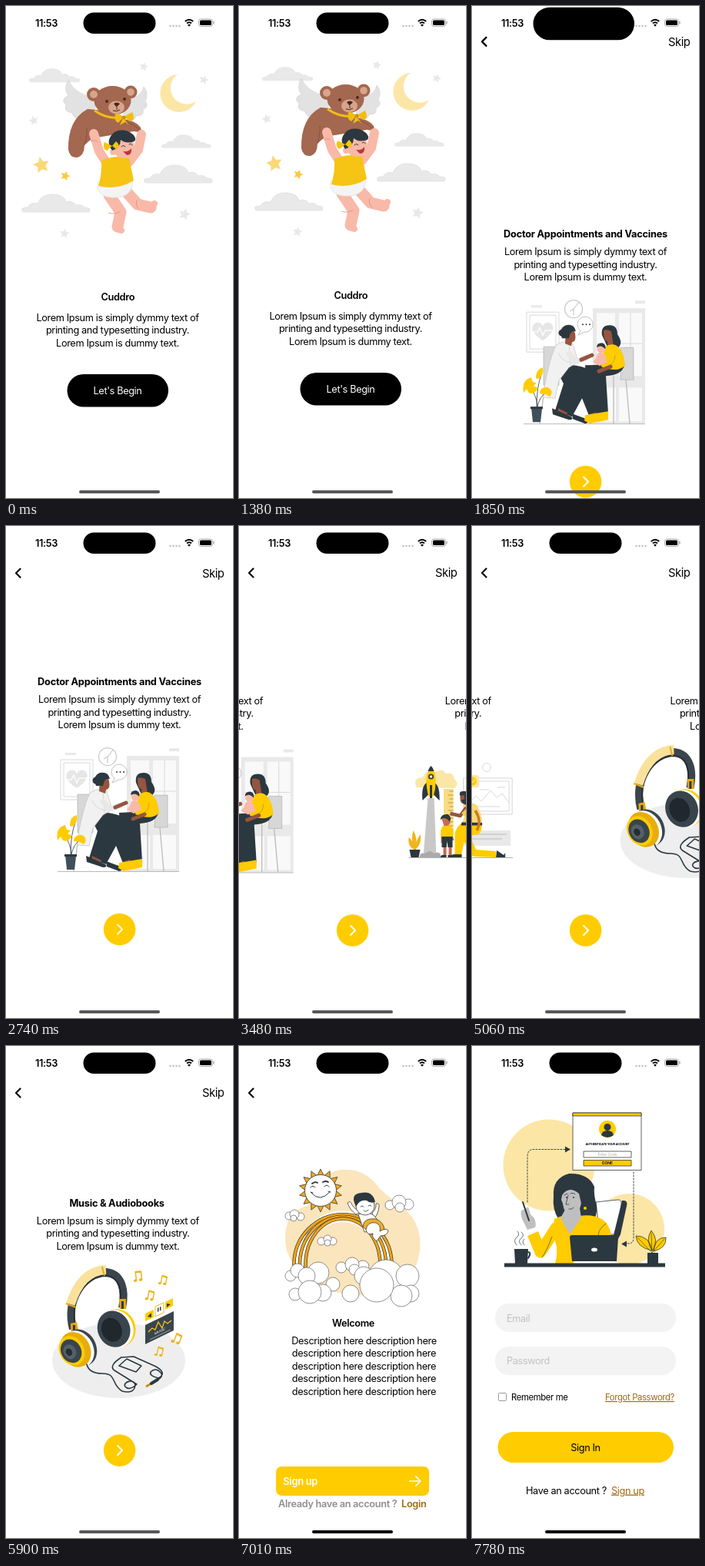
Write an HTML page that moves like this. It is 295 by 640 pixels and loops after 7.88 s.

```html
<!DOCTYPE html>
<html lang="en">
<head>
<meta charset="utf-8">
<title>Baby app onboarding</title>
<style>
html, body { margin: 0; height: 100%; overflow: hidden; background: #fff; }
svg { display: block; width: 100vw; height: 100vh; }
text { font: 12.76px Inter, "Liberation Sans", sans-serif; letter-spacing: -.03em; }
.c { text-anchor: middle; }
.b { font-weight: 600; letter-spacing: -.026em; }
.h { font-weight: 700; letter-spacing: -.018em; text-anchor: middle; }
.y { fill: #fc0; } .p { fill: #fce6a6; } .k { fill: #2c383f; } .g { fill: #e9e9e9; } .w { fill: #fff; }
.br { fill: #a4674f; } .sk { fill: #f8b9a8; } .dk { fill: #96553f; } .lk { fill: #a06a10; }
.l { fill: none; stroke: #2c383f; stroke-linecap: round; stroke-linejoin: round; }
.gl { fill: none; stroke: #d9d9d9; }
.o { stroke: #222; stroke-width: .7; stroke-linejoin: round; }
.u { text-decoration: underline; }
.s { font-size: 11.27px; }
</style>
</head>
<body>
<svg viewBox="0 0 295 640" preserveAspectRatio="none">
<defs>
  <path id="cloud" d="M2 24Q-3 18 8 18Q12 11 21 13Q26 0 42 1Q56 2 58 11Q66 8 71 15Q78 13 82 18Q92 18 88 24Z" stroke="#ddd" stroke-width=".7"/>
  <path id="star" stroke-linejoin="round"/>
  <g id="note"><path d="M-3 5L-1-6L6-4L4 6" fill="none" stroke="#efb41c" stroke-width="1.5"/><path d="M-1-5.500L6-3.500" stroke="#efb41c" stroke-width="2.400"/><ellipse cx="-4.500" cy="5" rx="2.300" ry="1.800" fill="#efb41c"/><ellipse cx="2.500" cy="6" rx="2.300" ry="1.800" fill="#efb41c"/></g>
  <g id="lorem" class="c"><text x="147.5" y="231.7">Lorem Ipsum is simply dymmy text of</text><text x="147.5" y="248.2">printing and typesetting industry.</text><text x="147.5" y="264.7">Lorem Ipsum is dummy text.</text></g>
</defs>

<g id="intro">
  <g class="g">
    <use href="#cloud" transform="translate(30 81)scale(.74)"/><use href="#cloud" transform="translate(202 167)scale(.72)"/>
    <use href="#cloud" transform="translate(179 206)"/><use href="#cloud" transform="translate(20 244)"/>
    <use href="#star" transform="translate(179 79)rotate(15)scale(.6)"/><use href="#star" transform="translate(257 96)rotate(20)scale(.62)"/>
    <use href="#star" transform="translate(36 149)rotate(-15)scale(.65)"/><use href="#star" transform="translate(232 271)rotate(15)scale(.8)"/>
    <use href="#star" transform="translate(76 296)rotate(10)scale(.65)"/>
  </g>
  <path class="p" d="M223 89A24.500 24.500 0 1 0 247 124A21.200 21.200 0 0 1 223 89Z"/>
  <use href="#star" fill="#f9d877" transform="translate(46 207)rotate(-12)scale(1.1)"/>
  <use href="#star" fill="#facc3c" transform="translate(77 221)rotate(20)scale(.65)"/>
  <g fill="#e2e2e2" stroke="#d2d2d2" stroke-width=".6">
    <path d="M116 120Q88 114 81 96Q74 108 81 117Q70 121 78 129Q74 137 86 139Q87 148 100 146L116 146Z"/>
    <path d="M150 124Q176 120 179 105Q186 113 181 124Q187 130 178 135Q180 143 169 143Q168 152 154 146Z"/>
  </g>
  <path class="br" d="M106 134Q80 148 81 187Q83 198 93 197Q102 194 102 181Q112 170 125 170L166 163Q178 166 175 158Q170 150 153 147L128 136Z"/>
  <path d="M102 181Q106 168 105 158M151 150Q165 152 173 161" fill="none" stroke="#844a39" stroke-width=".8"/>
  <g class="br"><circle cx="114" cy="115" r="9"/><circle cx="162" cy="112" r="8.500"/><ellipse cx="138.500" cy="123" rx="24" ry="19"/></g>
  <g fill="#d7a48c"><circle cx="114" cy="115" r="5"/><circle cx="162" cy="112" r="4.800"/><ellipse cx="143.500" cy="132" rx="10.500" ry="8.500"/></g>
  <g fill="#49271f"><circle cx="131" cy="124" r="1.900"/><circle cx="154" cy="121" r="1.900"/><path d="M140 127Q144 124 148 127Q145 131 143 131Z"/></g>
  <path d="M144 131V135M139 136Q144 138 148 135" fill="none" stroke="#49271f"/>
  <path d="M115 136Q132 148 153 145" fill="none" stroke="#f2bd12" stroke-width="3"/>
  <path fill="#f2bd12" d="M153 144L143 139Q139 150 146 152ZM153 144L164 138Q169 149 161 150ZM152 145L148 155L155 151L160 155Z"/>
  <circle cx="153" cy="145" r="2.500" fill="#cc930b"/>
  <g fill="none" stroke="#f8b9a8" stroke-linecap="round" stroke-linejoin="round">
    <path d="M114 166L121 189L132 206" stroke-width="12"/><path d="M176 167L172 187L160 203" stroke-width="12"/>
    <path d="M134 246L149 268L145 287" stroke-width="15"/><path d="M155 240L171 258L188 262" stroke-width="15"/>
    <path d="M144 290L150 292M189 264L193 257" stroke-width="8"/>
  </g>
  <path d="M133 269Q142 272 148 267M170 252Q168 260 173 264M110 176Q117 173 119 177" fill="none" stroke="#df8b79" stroke-width=".8"/>
  <path d="M119 229L164 224Q167 242 151 248Q124 253 119 237Z" fill="#f4f4f4" stroke="#ddd" stroke-width=".6"/>
  <path d="M124 201Q144 193 160 198L166 227Q145 240 120 234Q125 218 124 201Z" fill="#f6c414"/>
  <circle class="sk" cx="153" cy="184" r="14"/><circle class="sk" cx="139" cy="190" r="4"/>
  <path class="k" d="M138 188Q128 175 141 164Q153 158 165 167Q170 172 167 176Q156 180 149 174Q149 184 138 188Z"/>
  <path d="M150 183Q153 180 155 183M160 180Q163 178 164 181" class="l" stroke-width="1"/>
  <path d="M152 189Q160 190 163 185Q164 194 157 194Z" fill="#b63b38"/>
  <path fill="#f6c414" d="M138 182L128 177Q124 186 131 188ZM138 182L143 176Q150 182 144 187Z"/>
  <g class="c"><text class="b" x="145.300" y="383">Cuddro</text><text x="145" y="409.700">Lorem Ipsum is simply dymmy text of</text><text x="145" y="426.200">printing and typesetting industry.</text><text x="145" y="442.700">Lorem Ipsum is dummy text.</text></g>
  <rect x="79.500" y="479" width="131.500" height="42.500" rx="21.200"/><text class="c w" x="145" y="505">Let's Begin</text>
</g>

<g id="walk">
 <g class="page">
  <text class="h" x="147.500" y="208.500">Doctor Appointments and Vaccines</text>
  <use href="#lorem"/>
  <g><g transform="translate(0 1.4)">
    <path class="g" d="M77 295h14v3h-14zM212 289h13v4h-13zM157 299h68v150h-68z"/>
    <path fill="#f9f9f9" d="M162 305h24v82h-24zM191 305h30v82h-30zM162 402h25v44h-25zM191 402h30v44h-30z"/>
    <path class="gl" d="M71 304h42v52h-42zM75 308h34v44h-34zM206 305v82M162 345h59"/>
    <path d="M92 341Q72 328 81 319Q88 315 92 322Q96 315 103 319Q111 328 92 341Z" fill="#e6e6e6"/><path d="M77 330h8l3-6 4 10 3-6h12" fill="none" stroke="#fff" stroke-width="1.300"/>
    <circle cx="132" cy="300" r="11.500" class="w" stroke="#c8c8c8" stroke-width="1.200"/><path d="M139 291L132 300L127 303M132 300V308" fill="none" stroke="#aaa" stroke-width=".8"/>
    <path d="M67 449.500H225" stroke="#888" stroke-width=".6"/>
    <path d="M93 349h20v50h-20zM193 350h17v42h-17z" fill="#d7d7d7" stroke="#aaa" stroke-width=".6"/><path d="M95 399L88 449M200 392L205 449M184 386V449" stroke="#bbb" stroke-width="1.300"/>
    <path class="w" stroke="#999" stroke-width=".6" d="M141 328L138 334L146 330A10 10 0 1 0 141 328Z"/>
    <g class="k"><circle cx="144" cy="320" r="1"/><circle cx="148.500" cy="320" r="1"/><circle cx="153" cy="320" r="1"/></g>
    <path class="k" d="M169 334Q167 321 179 321Q189 321 189 333Q197 344 190 350L176 349Z"/>
    <path class="dk" d="M171 328Q175 326 181 329L184 348L176 350L176 342Q171 342 171 328Z"/>
    <path class="k" d="M147 373Q164 373 181 370L198 373Q195 386 174 387L177 436H160L148 388Z"/>
    <path class="y" d="M172 350Q180 344 187 347Q197 353 199 373Q192 381 178 378L168 375Z"/>
    <path d="M176 375Q186 371 186 360" fill="none" stroke="#c99609" stroke-width=".8"/>
    <path d="M180 375L165 381" stroke="#96553f" stroke-width="5" stroke-linecap="round"/>
    <path class="sk" d="M163 358Q168 355 173 360L176 369L166 374L157 369L161 364Z"/><circle class="sk" cx="168" cy="352" r="5.500"/><path class="k" d="M162 350Q162 344 169 344Q175 346 173 352Q168 346 162 350Z"/>
    <path class="k" d="M107 374Q128 370 149 377Q156 380 157 391L172 435L153 441L143 416L130 440L108 432L119 397Z"/>
    <path class="dk" d="M112 429l12 6-2 5-11-5zM152 437l9-3 3 6-11 4z"/>
    <path class="k" d="M104 429L129 440Q133 444 126 444L105 437ZM130 436L149 443Q154 448 147 449L131 443Z"/><path class="y" d="M147 438l30-5v11l-24 5-7-4Z"/>
    <path d="M109 347Q121 339 131 345L138 369L126 376L113 393L108 416L92 415Q98 371 109 347Z" fill="#f1f1f1" stroke="#bbb" stroke-width=".6"/>
    <path d="M126 344L128 374M112 357Q119 374 140 368" class="gl"/>
    <path d="M124 356L135 368L150 363" fill="none" stroke="#e8e8e8" stroke-width="7" stroke-linejoin="round"/><path d="M142 366L156 360" stroke="#96553f" stroke-width="5" stroke-linecap="round"/>
    <path class="dk" d="M122 329L133 328Q137 342 130 343L129 348L121 345Z"/>
    <path class="k" d="M117 338Q112 325 122 321Q133 319 135 329Q128 327 126 338Z"/><circle class="k" cx="117" cy="331" r="4.500"/>
    <path d="M84 429Q84 400 90 386M85 427Q84 412 76 403M85 427Q88 413 97 408" class="l" stroke-width=".8"/>
    <path class="y" d="M83 390Q83 378 92 376Q94 386 86 391ZM67 409Q64 392 77 389L79 395L84 396L80 400L86 403Q81 412 74 409L71 404ZM88 410Q88 401 99 402Q107 407 101 414L96 411Z"/>
    <path d="M77 428h14l-2 19h-10Z" fill="#40505b"/><path class="k" d="M76 427h16v3h-16z"/>
  </g></g>
 </g>

 <g class="page">
  <text class="h" x="147.500" y="208.500">Baby's Growth</text>
  <use href="#lorem"/>
  <g><g transform="translate(1.8 0)">
    <path class="p" d="M88 340Q83 327 96 327Q101 316 112 320Q122 314 126 322Q137 320 137 329Q145 336 137 341Z"/>
    <path d="M149 328h65v47h-65z" fill="#fff" stroke="#d5d5d5"/><path class="gl" d="M153 332h57v39h-57zM157 361l10-10 7 7 12-14 8 9 7-5 9 12M172 343h12M195 340h10M167 365h31"/>
    <circle cx="181" cy="314" r="5.500" class="gl"/><path d="M146 396h66v20h-66z" class="g"/><path d="M149 401h58M149 407h52" stroke="#d3d3d3" stroke-width="2.500"/>
    <rect x="154" y="324" width="17" height="16" rx="3" class="p"/><circle class="y" cx="162.500" cy="332" r="5.500"/><path d="M160 332l2 2 3.500-4" class="l" style="stroke:#fff"/>
    <path d="M123.500 342h12.500v60h-12.500z" fill="#f9dc82"/><path d="M131 345h5m-7 5h7m-5 5h5m-7 5h7m-5 5h5m-7 5h7m-5 5h5m-7 5h7m-5 5h5m-7 5h7m-5 5h5" stroke="#a98427" stroke-width=".8"/>
    <path d="M103 354h8L114 431H97Z" fill="#c8c8c8"/><path d="M92 431Q93 424 99 426Q106 420 111 426Q120 422 120 431Z" fill="#aaa"/>
    <path class="k" d="M101 334Q94 339 96 357L103 350H111L118 357Q119 339 112 334Z"/>
    <path class="y" d="M107 312Q100 321 101 335Q102 346 104 352H110Q113 343 113 333Q114 321 107 312Z"/>
    <path class="k" d="M107 312Q104 315 103 319H111Q110 315 107 312ZM105.500 337h3v17h-3z"/><circle class="k" cx="107" cy="326" r="3.500"/><circle cx="107" cy="326" r="1.800" fill="#fff"/>
    <path d="M78 431.500H215" stroke="#777" stroke-width=".6"/>
    <path class="k" d="M79 421h14l-2 10h-10Z"/><path fill="#f0b51c" d="M86 421Q80 408 84 396Q90 405 87 421ZM85 421Q76 416 78 405Q85 410 86 421ZM87 421Q86 411 93 401Q96 412 87 421Z"/>
    <path class="y" d="M146 387L174 388Q176 396 170 401L159 403L167 421L193 423V431L165 430Q157 428 155 417L150 411L146 430H138V402Q138 394 146 387Z"/>
    <path class="k" d="M137 427h10v4h-17q0-3 7-4ZM194 422l9 6 2-3v6h-12z"/>
    <path d="M148 361Q158 357 168 363Q175 374 175 388L147 387L152 374Z" fill="#f9da78"/><path class="k" d="M147 385.500L175 386V389.500H146Z"/>
    <path d="M153 366L145 377L132 374" fill="none" stroke="#96553f" stroke-width="4.500" stroke-linejoin="round"/><path d="M160 366L149 376" stroke="#f2cb56" stroke-width="7"/>
    <path d="M166 370Q175 384 168 396" fill="none" stroke="#c77d24" stroke-width="3.500"/>
    <path class="dk" d="M145 350h11v11q-4 4-7 0-5 0-4-11Z"/><path class="k" d="M145 351Q142 344 151 345Q161 346 158 354Q157 364 149 361L146 357L151 355L150 350Z"/>
    <path fill="#c46b50" d="M121 381Q121 377 127 377Q133 378 132 386Q130 391 124 390ZM120 396l3 14-3 3zM123 415h4v14h-4zM130 415h4v14h-4zM133 395l4 14h-3z"/>
    <path class="k" d="M119 382Q120 374 129 375Q135 379 131 385Q129 380 123 380ZM121 403h14v15h-6l-1-8-1 8h-6zM121 428h6v3h-8zM129 428h6v3h-6z"/><path class="y" d="M123 390h9q5 4 4 14h-16q-2-10 3-14Z"/>
  </g></g>
 </g>

 <g class="page">
  <text class="h" x="147.500" y="208.500">Music &amp; Audiobooks</text>
  <use href="#lorem"/>
  <g><g transform="translate(1 0)">
    <ellipse cx="146.500" cy="409" rx="86.500" ry="49" fill="#eee"/>
    <path d="M87 368C77 330 100 292 130 294C151 296 156 318 151 341" fill="none" stroke="#3b454d" stroke-width="10"/>
    <path d="M91 366C82 332 104 299 130 299C147 300 151 317 148 336" fill="none" stroke="#262e34" stroke-width="2"/>
    <path d="M84 336C91 313 105 292 130 291" fill="none" stroke="#fae19b" stroke-width="12"/>
    <path d="M78 335L91 340M125 287L128 299" stroke="#e3ad1b" stroke-width="2"/>
    <path d="M84 361l8-2 3 14-10 4ZM147 329h9v13h-8Z" fill="#e3a910"/><path class="k" d="M87 363h3v12h-3zM150 332h3v10h-3z"/>
    <g transform="rotate(-22 143 367)"><ellipse class="y" cx="146" cy="368" rx="22" ry="25"/><ellipse cx="143" cy="368" rx="22" ry="25" class="w"/><ellipse cx="140" cy="367" rx="21" ry="24" fill="#39444c"/><ellipse cx="137" cy="367" rx="13" ry="16" fill="#20282e"/></g>
    <g transform="rotate(-28 90 394)"><ellipse cx="97" cy="396" rx="20" ry="25" fill="#3b454d"/><ellipse cx="93" cy="396" rx="20" ry="25" class="w"/><ellipse cx="90" cy="395" rx="19" ry="24" fill="#e7ad0e"/><ellipse class="y" cx="85" cy="394" rx="16" ry="20"/><ellipse cx="84" cy="394" rx="13" ry="16" fill="#39444c"/><ellipse cx="82" cy="394" rx="8" ry="10" fill="#566067"/><ellipse cx="81" cy="394" rx="4" ry="5" fill="#252d33"/></g>
    <path class="l" stroke-width="1.600" d="M105 414Q108 426 125 426C145 426 136 440 151 449Q167 453 168 441C167 432 151 437 155 443Q160 449 170 440L141 422Q133 416 150 405L166 404L195 417Q210 426 198 432Q186 429 188 424Q195 417 202 426Q205 432 190 438M147 416L157 407L176 416L169 424Z"/>
    <path d="M189 439L182 443" stroke="#c78d18" stroke-width="3"/><path d="M197 434L189 439" class="l" stroke-width="4"/>
    <path d="M181 363L218 345V370L181 388Z" fill="#39444c"/><path d="M185 372l5-5 4 2 4-10 5 8 3-9 4 3 5-4" fill="none" stroke="#f8c318" stroke-width="1.300"/>
    <text class="w" transform="matrix(1 -.48 0 1 193 376)" style="font-size:4.500px">MUSIC</text><path d="M187 382l27-13" stroke="#ccc" stroke-width=".7"/>
    <path class="y" d="M181 348l11-5v10l-11 5zM207 333l10-5v10l-10 5z"/><path d="M194 339l11-5v13l-11 5z" fill="#fff" stroke="#edba28"/>
    <path class="k" d="M189 347v6l-5-1ZM209 335l5 1-5 4ZM197 341l1.500-.7v5l-1.500.7zM200 339.500l1.500-.7v5l-1.500.7z"/>
    <use href="#note" transform="translate(171 299)rotate(-18)"/><use href="#note" transform="translate(204 304)scale(.9)"/><use href="#note" transform="translate(187 324)scale(.95)"/><use href="#note" transform="translate(222 380)rotate(10)"/><use href="#note" transform="translate(199 397)scale(.9)"/>
  </g></g>
 </g>

 <g class="page">
  <text class="b c" x="147.500" y="364.500">Welcome</text>
  <g id="about" class="c"></g>
  <g>
    <path fill="#fbe5bd" d="M61 266C54 232 68 212 88 208C100 190 104 168 126 162C150 157 168 167 179 182C195 202 230 212 234 249C237 283 219 317 190 322C133 332 77 312 61 266Z"/>
    <g id="rainbow" fill="none"></g>
    <path id="rays" class="o" fill="#f0a91d" transform="translate(105 188)scale(2.8)"/>
    <circle class="w o" cx="105" cy="188" r="20.500"/>
    <path class="l" stroke-width="1" d="M93 191Q104 204 117 190M92 184q3-4 6 0M110 183q3-4 6 0M92 190l3 1M115 189l3 1"/><path d="M94 179q4-3 7-1M108 177q4-2 7 0" class="l" stroke-width="1.800"/>
    <path class="w o" d="M151 219Q143 213 140 204Q144 200 146 207Q150 213 157 216ZM172 217Q178 212 177 205Q182 204 181 209Q180 219 174 225Z"/>
    <path class="w o" d="M154 219Q167 214 175 221Q183 231 184 239L162 242Z"/>
    <path class="o" fill="#eeb02c" d="M160 235Q161 223 177 225Q187 229 188 239L171 245Z"/>
    <path class="w o" d="M164 239Q166 228 177 230Q184 233 182 241Q190 236 193 240Q192 247 183 247L178 254Q171 249 173 244Q166 247 164 239Z"/>
    <circle class="w o" cx="163" cy="208" r="12"/><path class="k" d="M149 204Q145 192 158 191Q173 188 176 203Q169 205 165 201Q156 199 151 209Z"/><path class="l" stroke-width=".8" d="M157 209q2-2 4 0M167 208q2-2 4 0M161 214q4 3 6-1"/>
    <g id="puffs" class="w o" style="stroke-width:.5"></g>
  </g>
 </g>

 <g id="btn"><rect class="y" id="pill"/><g id="chev"><path d="M-3-6L3 0L-3 6" class="l" stroke-width="2" style="stroke:#fff"/></g><g id="go"><text class="b w" x="-89" y="4.500">Sign up</text><path class="l" style="stroke:#fff" stroke-width="1.600" d="M73 0H87M81-6L87 0L81 6"/></g></g>
 <g id="foot"><text class="b" x="51" y="601.500" fill="#8e8e8e">Already have an account ?</text><text class="b lk" x="211" y="601.500">Login</text></g>
</g>

<g id="nav"><path d="M18.500 55.500L13 61L18.500 66.500" fill="none" stroke="#000" stroke-width="2.200" stroke-linecap="round" stroke-linejoin="round"/><text id="skip" x="255" y="66.300" style="font-size:14.800px">Skip</text></g>

<g id="login">
  <path class="w" d="M0 0h295v640h-295z"/>
  <circle class="p" cx="100" cy="155" r="59.500"/><circle class="p" cx="204" cy="238" r="46"/>
  <g class="o"><path class="w" d="M131 87h89v74.500h-89z"/><path class="y" d="M131 87h89v4h-89z"/><path class="w" d="M145 137h62v8h-62z"/><path class="y" d="M145 148.500h62v7.500h-62z"/></g>
  <circle class="y" cx="176" cy="108" r="11"/><path class="k" d="M168 116Q169 110 176 110Q183 110 184 116Q176 122 168 116Z"/><circle class="k" cx="176" cy="105.500" r="4.500"/>
  <g class="c"><text x="176" y="128.500" style="font:700 4px Roboto,sans-serif">AUTHENTICATE YOUR ACCOUNT</text><text x="176" y="143" fill="#aaa" style="font-size:5px">Enter Code</text><text class="b" x="176" y="154.400" style="font-size:5px">DONE</text></g>
  <path class="l" stroke-width=".9" stroke-dasharray="2 2" d="M72 203V144Q72 134.500 80 134.500H121M210 164V250Q210 257 203 257H201"/><path class="k" d="M121 130.500l7 4-7 4zM201 253.500l-7 4 7 4z"/>
  <path class="w o" d="M161 203L190 200Q195 200 194 207L188 245H166Z"/><path class="k" d="M195 201Q203 200 201 208L193 245L182 266L184 246Z"/>
  <path class="k" d="M106 196Q104 172 126 166Q151 165 159 183Q158 195 162 207Q164 235 139 235L113 226Q104 213 106 196Z"/>
  <path class="y" d="M107 225Q121 218 133 222Q156 217 170 226Q180 233 181 249L132 250V283H108Q114 260 104 246Z"/>
  <path d="M111 234L89 268L79 244" fill="none" stroke="#fc0" stroke-width="15" stroke-linejoin="round"/><path d="M104 248Q97 267 91 275M174 231Q165 237 164 246" class="l" stroke-width=".6"/>
  <g fill="#bfbfbf"><path d="M122 211H140L142 224L127 245L115 224ZM72 239L65 225Q61 212 68 213L73 209L76 219L81 224Q84 232 82 236Z"/><path d="M118 189Q133 183 142 193Q144 213 132 221Q120 221 118 205L116 200Z"/></g>
  <path class="k" d="M117 194Q126 181 139 192L143 209Q157 197 147 179Q128 169 115 180Z"/><path class="l" stroke-width=".8" d="M120 194l4-2M128 192q4-2 6 1M125 194L122 206H126M126 212q4 1 6-2"/><circle class="k" cx="123" cy="197" r="1"/><circle class="k" cx="132" cy="197" r="1"/><circle class="y" cx="147" cy="211" r="2"/>
  <path class="l" stroke-width="2" d="M66 203L74 227"/>
  <path class="k" d="M130 246h58q2 0 2 3l-2 31h-58l-3-31q0-3 3-3ZM42 282.500h209v5H42zM55 264h18l-1 19H56z"/><ellipse class="w" cx="159" cy="265" rx="4" ry="2.500"/>
  <path class="l" stroke-width="2" d="M72 268q6 0 1 8"/><path class="l" stroke-width=".7" d="M58 259q-5-6 0-10t1-8M64 259q-5-5 0-9t0-8M68 259q-4-4 0-8"/>
  <path class="y o" d="M234 266Q214 262 213 247Q231 247 234 266ZM234 266Q225 252 233 240Q243 252 235 266ZM236 267Q237 249 252 249Q253 263 236 267Z"/><path class="k" d="M228 269h14v14h-14z"/><path class="l" stroke-width=".6" d="M215 249L234 269L233 243M250 251L234 269"/>
  <g fill="#f3f3f4"><rect x="30" y="335" width="235" height="37" rx="18"/><rect x="30" y="391" width="235" height="37" rx="18"/></g>
  <g fill="#c2c2c5"><text x="45" y="358.700">Email</text><text x="45" y="414.300">Password</text></g>
  <rect x="34.500" y="451.500" width="10" height="10" rx="1" fill="none" stroke="#999"/><text class="s" x="51" y="461">Remember me</text><text class="s lk u" x="173" y="461">Forgot Password?</text>
  <rect class="y" x="33.500" y="502" width="228.500" height="40" rx="20"/><text class="c" x="147.500" y="526.500">Sign In</text>
  <text x="70" y="582.500">Have an account ?</text><text class="lk u" x="181" y="582.500">Sign up</text>
</g>

<text class="b" x="38" y="26.500">11:53</text>
<rect x="100.500" y="8.500" width="94" height="27.500" rx="13.700"/>
<path d="M213.500 26H226" stroke="#bbb" stroke-width="2.400" stroke-linecap="round" stroke-dasharray="0 4"/>
<path d="M232.800 20Q238 15.500 243.200 20M235 22.600Q238 20 241 22.600" fill="none" stroke="#000" stroke-width="2"/><path d="M236 24.500Q238 23 240 24.500L238 26.800Z"/>
<rect x="250.500" y="17" width="18" height="9.500" rx="2.800" fill="none" stroke="#aaa"/><rect x="252" y="18.500" width="15" height="6.500" rx="1.500"/><path d="M270 20v3.500" stroke="#aaa" stroke-width="1.300"/>
<rect id="home" x="95" y="630" width="105" height="4" rx="2"/>
</svg>
<script>
const $ = id => document.getElementById(id);
const LOOP = 7880, RISE = 1366, TAPS = [3057, 4625, 6227], LOGIN = 7780, W = 295, H = 570;

const spikes = (n, outer, inner) => 'M' + Array.from({length: 2 * n}, (_, i) => {
  const a = i * Math.PI / n, r = i % 2 ? inner : outer;
  return [r * Math.sin(a), -r * Math.cos(a)].map(v => v.toFixed(2));
}).join('L') + 'Z';
$('star').setAttribute('d', spikes(5, 10, 4.8));
$('rays').setAttribute('d', spikes(14, 10, 7));
$('rays').style.strokeWidth = .25;

// The stripes share nearly the same crown and spread towards the feet
const arch = (r, color, width) => `<path d="M${134 - r} 290V284A${r} ${42 + r * .36} 0 0 1 ${134 + r} 284V290" stroke="${color}" stroke-width="${width}"/>`;
$('rainbow').innerHTML = arch(56, '#fff', 15) +
  [63.5, 56, 48.5].map(r => arch(r, '#222', 4.4) + arch(r, '#eca51d', 3.2)).join('');

// Each puff is x, y, radius
$('puffs').innerHTML = [
  [64,221,5],[79,222,5],[71,219,6],[70,224,4], [195,207,6],[219,206,7],[207,203,9],[208,210,6],
  [106,254,5],[121,254,5],[114,251,5],[114,256,4], [132,288,7],[160,287,8],[146,284,9],[149,291,7],
  [66,299,7],[75,292,9],[102,295,14],[87,299,11],[121,310,9],[72,323,8],[108,321,11],[91,320,15],
  [144,322,11],[161,299,12],[190,301,23],[218,299,15],[222,322,11],[210,325,14],[178,311,22]
].map(([x, y, r]) => `<circle cx="${x}" cy="${y}" r="${r}"/>`).join('');

$('about').innerHTML = [0, 1, 2, 3, 4].map(i =>
  `<text x="147.5" y="${387.7 + i * 16.5}">${i ? 'd' : 'D'}escription here description here</text>`).join('');

// Share of the way still to go in a damped spring, ms after its start
function left(ms, response = .9, damping = .8) {
  if (ms <= 0) return 1;
  const t = ms / 1000, w = 2 * Math.PI / response, s = damping * w, d = Math.sqrt(w * w - s * s);
  return Math.exp(-s * t) * (Math.cos(d * t) + s / d * Math.sin(d * t));
}
const clamp = v => Math.max(0, Math.min(1, v));
const move = (el, x, y, k = 1) => el.setAttribute('transform', `translate(${x} ${y})scale(${k})`);
const pages = [...document.querySelectorAll('.page')].map(p => [...p.children]);
// Delays of title, description and picture
const LEAVE = [0, 100, 200], ENTER = [400, 300, 200], ENTER_LAST = [200, 300, 200];

function draw(t) {
  const r = left(t - RISE, 1.1, .85);
  move($('intro'), 0, H * (r - 1));
  move($('walk'), 0, H * r);
  move($('nav'), 0, -90 * r);

  pages.forEach((parts, i) => parts.forEach((el, j) => {
    const delay = (i === 3 ? ENTER_LAST : ENTER)[j];
    const come = i ? left(t - TAPS[i - 1] - delay) : 0;
    const gone = i < 3 ? 1 - left(t - TAPS[i] - LEAVE[j]) : 0;
    move(el, W * (come - gone), 0);
  }));

  const rest = left(t - TAPS[2]), p = 1 - rest;
  const w = 41.5 + 155.2 * p, h = 41.5 - 3.6 * p;
  const box = {x: -w / 2, y: -h / 2, width: w, height: h, rx: 20.75 - 13.5 * p};
  for (const k in box) $('pill').setAttribute(k, box[k]);
  move($('btn'), 147.6, 526 + 39.4 * p);
  move($('chev'), .5, 0, clamp(rest));
  move($('go'), 0, 0, p);
  $('go').style.opacity = clamp(p);
  move($('foot'), 0, 75 * rest);

  const f = clamp((t - TAPS[2]) / 350);
  $('skip').style.opacity = 1 - f * f * (3 - 2 * f);
  const shade = 88 * (1 - f);
  $('home').style.fill = `rgb(${shade},${shade},${shade})`;
  $('login').style.display = t < LOGIN ? 'none' : '';
}

const start = performance.now();
(function tick() {
  draw((performance.now() - start) % LOOP);
  requestAnimationFrame(tick);
})();
</script>
</body>
</html>
```
